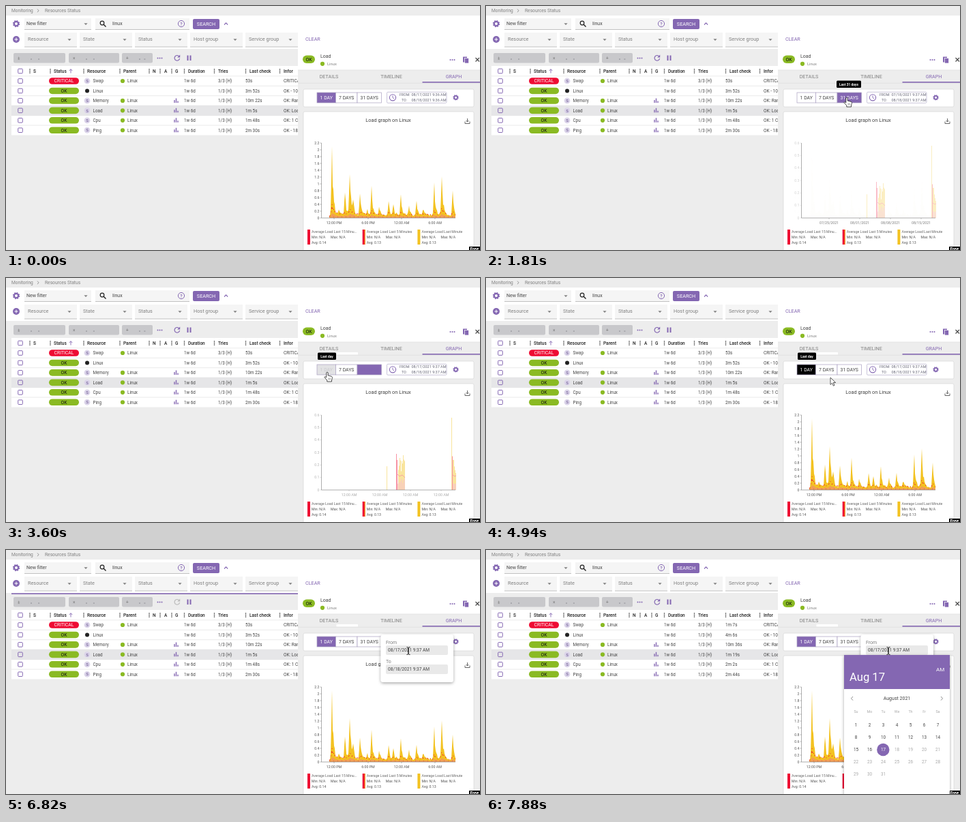
Write an HTML page that moves like this. It is 695 px wide and 358 px high and loops after 8000 ms.

```html
<!DOCTYPE html>
<html lang="en">
<head>
<meta charset="utf-8">
<title>Resources status</title>
<style>
html, body { margin: 0; width: 100%; height: 100%; overflow: hidden; background: #ededed; }
svg { display: block; width: 695px; height: 358px; font-family: Roboto, Arial, sans-serif; }
</style>
</head>
<body>
<svg id="stage" viewBox="0 0 695 358" xmlns="http://www.w3.org/2000/svg"></svg>
<script>
const LOOP = 8000;
const PURPLE = '#8467b2', GREEN = '#8aba23', RED = '#ee0b33', YELLOW = '#f3c220', INK = '#444', GREY = '#808080';

// Drawing helpers
const rect = (x, y, w, h, fill, more = '') => `<rect x="${x}" y="${y}" width="${w}" height="${h}" fill="${fill}" ${more}/>`;
const dot = (x, y, r, fill, more = '') => `<circle cx="${x}" cy="${y}" r="${r}" fill="${fill}" ${more}/>`;
const line = (d, color, w = 1, more = '') => `<path d="${d}" fill="none" stroke="${color}" stroke-width="${w}" ${more}/>`;
const fill = (d, color, more = '') => `<path d="${d}" fill="${color}" ${more}/>`;
const text = (x, y, s, size = 6.5, color = INK, anchor = 'start', more = '') =>
  `<text x="${x}" y="${y}" font-size="${size}" fill="${color}" text-anchor="${anchor}" ${more}>${s}</text>`;
const mid = (x, y, s, size, color, more) => text(x, y, s, size, color, 'middle', more);
const group = (id, body, more = '') => `<g id="${id}" ${more}>${body}</g>`;
const BOLD = 'font-weight="500"';

const gear = (x, y, r) =>
  dot(x, y, r * .62, 'none', `stroke="${PURPLE}" stroke-width="${r * .45}"`) +
  dot(x, y, r * .88, 'none', `stroke="${PURPLE}" stroke-width="${r * .3}" stroke-dasharray="${r * .38} ${r * .311}"`);
const caret = (x, y, c = GREY) => fill(`M${x - 2.6} ${y - 1.3}h5.2l-2.6 2.7z`, c);
const dots = (x, y, c = PURPLE) => [-3, 0, 3].map(d => dot(x + d, y, 1, c)).join('');
const kebab = (x, y) => [-2.5, 0, 2.5].map(d => dot(x, y + d, .8, '#222')).join('');
const box = (x, y) => rect(x - 3.3, y - 3.3, 6.6, 6.6, 'none', `rx="1" stroke="${PURPLE}" stroke-width="1"`);

function filters() {
  let s = rect(0, 0, 695, 14, '#ededed') + rect(0, 14, 695, 49, '#fff');
  s += text(8, 9, 'Monitoring', 6.6, GREY) + line('M46 4.5l2 2.3-2 2.3', GREY, .8) + text(57, 9, 'Resources Status', 6.7, GREY);
  s += gear(15, 26, 5) + rect(27, 18, 98, 16.5, '#f5f5f5') + rect(131, 18, 138, 16.5, '#f5f5f5');
  s += line('M27 34.5h98M131 34.5h138', '#aaa', .7);
  s += text(30, 28.3, 'New filter', 7) + caret(117, 26.5);
  s += dot(141, 25, 2.8, 'none', 'stroke="#222" stroke-width="1.2"') + line('M143 27l3.5 3.5', '#222', 1.4);
  s += text(156, 28.3, 'linux', 7);
  s += dot(257, 26, 4.6, 'none', `stroke="${PURPLE}" stroke-width="1"`) + mid(257, 28.7, '?', 7, PURPLE, BOLD);
  s += rect(274, 19, 39, 15, PURPLE, 'rx="2"') + mid(293.5, 28.7, 'SEARCH', 7.2, '#fff');
  s += line('M320 27.5l2.6-2.6 2.6 2.6', PURPLE, 1.1);
  s += dot(15, 49, 5, PURPLE) + line('M12.5 49h5M15 46.5v5', '#fff', 1);
  ['Resource', 'State', 'Status', 'Host group', 'Service group'].forEach((name, i) => {
    const x = 27 + 81 * i;
    s += rect(x, 39, 77, 21, '#f5f5f5') + line(`M${x} 60h77`, '#aaa', .7) + text(x + 5, 51.2, name, 7.3, GREY) + caret(x + 66, 49.5);
  });
  return s + text(439, 51.3, 'CLEAR', 7.2, PURPLE);
}

const ROWS = [
  ['Swap', 53, 'CRITICAL'], ['Linux', 232, 'OK - 10'], ['Memory', 622, 'OK: Ram'],
  ['Load', 65, 'OK: Load'], ['Cpu', 108, 'OK: 1 CPU'], ['Ping', 150, 'OK - 18']
];
const ago = n => (n >= 60 ? Math.floor(n / 60) + 'm ' : '') + n % 60 + 's';

function table() {
  let s = rect(0, 63, 428, 295, '#ededed');
  [[11, 76], [92, 74], [170, 45]].forEach(([x, w], i) => {
    s += rect(x, 69, w, 14.5, '#c8c8cb', 'rx="2"') + text(x + 6, 78.5, ['±', '×', '+'][i], 6.5, '#777');
    s += line(`M${x + 25} 78h2m${w * .12} 0h2`, '#8b8b92', 1);
  });
  s += dots(225.5, 76.5);
  s += group('refresh', line('M253.6 73.6a3.8 3.8 0 1 0 1 3.6', 'currentColor', 1.2) + fill('M255.2 71.6v4h-4z', 'currentColor'));
  s += rect(265.5, 72.5, 2, 7.5, PURPLE) + rect(269.5, 72.5, 2, 7.5, PURPLE);
  s += rect(8, 88, 420, 101.5, '#fff') + box(21, 95.5);
  [[35, 40, 'S'], [65, 70, 'Status'], [114, 119, 'Resource'], [167, 172, 'Parent'], [210, 215, 'N'], [226, 232, 'A'],
    [243, 248, 'G'], [261.5, 267, 'Duration'], [305.5, 311, 'Tries'], [351.5, 357, 'Last check'], [401.5, 407, 'Infor']
  ].forEach(([k, x, name]) => s += kebab(k, 95.5) + text(x, 97.6, name, 6.5, '#222', 'start', BOLD));
  s += line('M95 98.5v-5.8m-2.3 2.3l2.3-2.3 2.3 2.3', PURPLE, .9);
  ROWS.forEach(([name, , info], i) => {
    const y = 110 + 14.45 * i, b = y + 2.3, crit = !i, host = i === 1;
    if (name === 'Load') s += rect(8, y - 7.2, 420, 14.4, '#e6e6e8');
    s += line(`M8 ${y - 7.2}h420`, '#dcdcdc', .6) + box(21, y);
    s += rect(63, y - 4.8, 44, 9.6, crit ? RED : GREEN, 'rx="4.8"') + mid(85, b, crit ? 'CRITICAL' : 'OK', 6.8, crit ? '#fff' : '#111');
    s += host ? dot(119, y, 3, '#222') : dot(119, y, 4.4, '#dcd5ea') + mid(119, y + 2.2, 'S', 6, '#5f4a86');
    s += text(127.5, b, name, 6.3);
    if (!host) s += dot(171, y, 3.1, GREEN) + text(178, b, 'Linux', 6.3);
    if (i > 1) s += line(`M247 ${y + 3}v-4M249.5 ${y + 3}v-6.5M252 ${y + 3}v-2.5`, PURPLE, 1.4);
    s += text(261, b, '1w 6d', 6.3) + text(311, b, (crit ? 3 : 1) + '/3 (H)', 6.3);
    s += text(351, b, '', 6.3, INK, 'start', `id="ago${i}"`) + text(407, b, info, 6.5);
  });
  return s + rect(8, 63.3, 420, 1.6, PURPLE, 'id="bar"');
}

function panel() {
  let s = rect(428, 63, 267, 295, '#ededed') + rect(428, 63, 267, 31, '#fff');
  s += rect(435, 72.5, 18, 11.5, GREEN, 'rx="5.7"') + mid(444, 81, 'OK', 7, '#111');
  s += text(461, 75.8, 'Load', 7) + dot(464, 84.8, 3.1, GREEN) + text(471, 87, 'Linux', 5.8, GREY);
  s += dots(654.5, 79);
  s += rect(670, 74.5, 6, 8, PURPLE) + rect(672.5, 76.5, 6, 7.5, PURPLE, 'stroke="#fff" stroke-width=".7"');
  s += line('M688.5 76l5.5 5.5m0-5.5l-5.5 5.5', '#444', 1.1);
  s += line('M428 94h267M428 113.2h267', '#d8d8d8', .6);
  s += mid(473.5, 106, 'DETAILS', 7.2, GREY) + mid(565, 106, 'TIMELINE', 7.2, GREY) + mid(656.5, 106, 'GRAPH', 7.2, PURPLE);
  s += rect(610.5, 111, 84.5, 1.6, PURPLE) + rect(484.5, 109, 31.5, 3.4, '#fff', 'id="strip"');
  const edge = 'rx="2" stroke="#d2d2d2" stroke-width=".6"';
  s += rect(436, 122, 250, 26, '#fff', edge) + rect(436, 155, 250, 210, '#fff', edge);
  [['1 DAY', 456, 27.5], ['7 DAYS', 483.5, 31.5], ['31 DAYS', 515, 35.5]].forEach(([name, x, w], i) => {
    s += rect(x, 127, w, 15, '#fff', `id="btn${i}" stroke="#aaa0c0" stroke-width=".7"`) + mid(x + w / 2, 136.8, name, 6.9, INK, `id="lab${i}"`);
  });
  s += rect(558.5, 126.3, 87.5, 16, '#fff', 'rx="1.5" stroke="#b4aecb" stroke-width=".7"');
  s += dot(567, 134.3, 4.6, 'none', `stroke="${PURPLE}" stroke-width="1.1"`) + line('M567 131.5v3l2 1.4', PURPLE, .9);
  s += text(577, 132, 'FROM:', 5.2, '#667') + text(580, 139.9, 'TO:', 5.2, '#667');
  s += text(594.5, 132, '', 5.5, '#667', 'start', 'id="from"') + text(594.5, 139.9, '', 5.5, '#667', 'start', 'id="to"');
  s += gear(659.5, 134.3, 4);
  s += mid(560.5, 170.2, 'Load graph on Linux', 7.4) + line('M676.5 165v5m-2-2l2 2 2-2M673 169.5v3h7v-3', '#555', .9);
  [['15 Minu...', RED, '0.14'], ['5 Minutes', RED, '0.13'], ['Minute', YELLOW, '0.13']].forEach(([name, c, avg], i) => {
    const x = 442 + 80.7 * i, y = [333, 341, 349];
    s += rect(x, 328, 4, 22, c) + (i === 1 ? rect(x + 3, 328, 1, 22, YELLOW) : '');
    s += text(x + 6, y[0], 'Average Load Last ' + name, 5.2, '#666') + text(x + 6, y[1], 'Min: N/A', 5.2, '#555');
    s += text(x + 34, y[1], 'Max: N/A', 5.2, '#555') + text(x + 6, y[2], 'Avg: ' + avg, 5.2, '#555');
  });
  return s + rect(679, 353, 16, 5, '#000') + text(680.5, 359, 'Free', 6.5, '#fff', 'start', 'font-weight="700"');
}

// Charts
const noise = i => { const v = Math.sin(i * 91.7) * 4375.5; return v - Math.floor(v); };
const PEAKS = [[478, 2], [488, .18], [497, .65], [504, 1.2], [509, .38], [519, .66], [530, .15], [536, .82], [547, .22], [561, .38],
  [568, .3], [579, .62], [591, .3], [602, .42], [612, .18], [628, .95], [639, 1.1], [655, .7]];
function load(x, gain, decay, base) {
  return PEAKS.reduce((sum, [p, v]) => {
    const d = x - p;
    return sum + v * gain * (d < 0 ? Math.exp(-d * d / 1.5) : Math.exp(-d / decay) * (d ? .6 + .6 * noise(x) : 1));
  }, base * (.6 + noise(x + .3)));
}
function curve(gain, decay, base, area) {
  let d = '';
  for (let x = 474; x <= 659; x++) d += `${d ? 'L' : 'M'}${x} ${(311 - 50 * load(x, gain, decay, base)).toFixed(1)}`;
  return area ? d + 'V311H474z' : d;
}
const bars = (x0, n, f) => Array.from({ length: n }, (_, i) => `M${x0 + i} 311v${(-183 * f(i)).toFixed(1)}h1V311z`).join('');

function scale(top, step) {
  let s = '';
  const n = Math.round(top / step);
  for (let i = 0; i <= n; i++) {
    const y = 311 - 110 * i / n;
    s += text(459.5, y + 1.8, +(i * step).toFixed(1), 5.2, '#555', 'end') + line(`M460.5 ${y}h2`, '#777', .5);
  }
  return s;
}
const ticks = (xs, names) => xs.map((x, i) => mid(x, 319.5, names[i % names.length], 5.3, '#555') + line(`M${x} 311v2`, '#777', .5)).join('');
const DAY_X = [481, 531, 580, 629], MONTH_X = [503, 548, 593, 638];

function charts() {
  const day = fill(curve(1, 2, .08, true), YELLOW) + fill(curve(.07, 6, .03, true), '#f0857a', 'opacity=".6"') +
    line(curve(.16, 4.5, .07), RED, .9, 'stroke-dasharray="2 5 1 4"') + line('M474 309.5h185', '#b33', .5, 'stroke-dasharray="1 5"');
  const month = fill(bars(558, 1, () => .19) + bars(575, 10, i => .13 + .15 * noise(i + 3)) + bars(653, 1, () => .58) +
    bars(655, 5, i => .24 - .03 * i + .04 * noise(i)), YELLOW) +
    fill(bars(572, 2, i => .29 - .05 * i) + bars(654, 1, () => .27), RED) +
    fill(bars(574, 11, i => .05 + .05 * noise(i)) + bars(655, 5, () => .05), '#f0857a', 'opacity=".7"') +
    line('M574 288l3 3 4-2 4 4M655 289l3 2 2-1', RED, .8);
  return group('day', scale(2.2, .2) + day) + group('month', scale(.6, .1) + month) +
    group('dayTicks', ticks(DAY_X, ['12:00 PM', '6:00 PM', '12:00 AM', '6:00 AM'])) +
    group('monthTicks', ticks(MONTH_X, ['07/25/2021', '08/01/2021', '08/08/2021', '08/15/2021'])) +
    group('hourTicks', ticks(MONTH_X, ['12:00 AM'])) +
    line('M462.5 201v110H659', '#777', .6);
}

function popover() {
  const field = (name, y, value) => text(557, y, name, 7, GREY) + rect(557, y + 2.5, 91, 14, '#e9e9e9', 'rx="2"') + text(560, y + 11.6, value, 6.6);
  return rect(549.5, 124, 106.5, 70, '#fff', 'rx="4" filter="url(#shade)"') + field('From', 137.5, '08/17/2021 9:37 AM') + field('To', 165.5, '08/18/2021 9:37 AM');
}

function calendar() {
  let s = rect(525, 154, 155, 210, '#fff', 'filter="url(#shade)"') + rect(525, 154, 155, 50, PURPLE);
  s += text(533, 191.5, 'Aug 17', 16.6, '#fff') + text(660, 178, 'AM', 8, '#fff');
  s += line('M538 215l-2.5 2.8 2.5 2.8M667 215l2.5 2.8-2.5 2.8', GREY, .9) + mid(602.5, 220, 'August 2021', 7);
  ['Su', 'Mo', 'Tu', 'We', 'Th', 'Fr', 'Sa'].forEach((d, i) => s += mid(542.5 + 20 * i, 239.3, d, 5.4, '#aaa'));
  s += dot(582.3, 293, 9.2, PURPLE);
  for (let d = 1; d <= 31; d++) {
    const i = d - 1;
    s += mid(542.5 + 20 * (i % 7), 258.6 + 18.1 * Math.floor(i / 7), d, 6.3, d === 17 ? '#fff' : d > 17 ? '#aaa' : INK);
  }
  return s;
}

const tip = (id, x, w, s, bg, fg) =>
  group(id, rect(x - w / 2, 109.5, w, 10.5, bg, 'rx="1.5"') + mid(x, 116.5, s, 4.9, fg, 'font-weight="700"'));

const cursors =
  group('arrow', fill('M0 0v10.5l2.5-2.3 1.8 4 1.7-.8-1.8-3.9h3.4z', '#fff', 'stroke="#333" stroke-width=".8"')) +
  group('hand', fill('M-1.2.8Q0-.8 1.2.8V5l5.2 1.4q1.2.5 1 2L6.5 12v2h-6.7v-2l-4-4.5q.8-1.8 3 .4z', '#fff', 'stroke="#222" stroke-width=".8"') +
    line('M2.2 8.5v3M4.2 8.5v3', '#222', .5)) +
  group('beam', line('M-2.5-5.5q2.5 0 2.5 1.2v8.6q0 1.2-2.5 1.2M2.5-5.5Q0-5.5 0-4.3v8.6q0 1.2 2.5 1.2', '#222', 1));

document.getElementById('stage').innerHTML =
  `<defs><filter id="shade" x="-20%" y="-20%" width="140%" height="140%"><feDropShadow dx="0" dy="1.5" stdDeviation="2.2" flood-opacity=".35"/></filter></defs>` +
  filters() + table() + panel() + charts() +
  tip('tip31', 532, 36, 'Last 31 days', '#000', '#fff') + tip('tip7', 499.7, 32, 'Last 7 days', PURPLE, '#111') + tip('tip1', 470.5, 27, 'Last day', '#000', '#fff') +
  group('popover', popover()) + group('calendar', calendar()) +
  group('cursor', dot(0, 5, 9, '#f6ef6a', 'id="glow" style="mix-blend-mode:multiply"') + cursors);

// Animation
const el = {};
document.querySelectorAll('[id]').forEach(n => el[n.id] = n);
const set = (id, name, v) => el[id].setAttribute(name, v);
const fade = (id, v) => set(id, 'opacity', v);
const ramp = (t, a, b) => Math.min(1, Math.max(0, (t - a) / (b - a)));
const ease = u => u * u * (3 - 2 * u);
const pulse = (t, a, b, c, d) => ramp(t, a, b) * (1 - ramp(t, c, d));

// time, x, y of the pointer
const PATH = [[190, 662, 215], [930, 529, 134], [2210, 529, 134], [2630, 479, 138], [2920, 471, 138], [4900, 471, 138],
  [4940, 505, 146], [5710, 600, 136], [6050, 600, 136], [6600, 590, 148], [LOOP, 590, 148]];
function pointer(t) {
  const i = Math.max(1, PATH.findIndex(p => p[0] >= t));
  const [t0, x0, y0] = PATH[i - 1], [t1, x1, y1] = PATH[i], u = ease(ramp(t, t0, t1));
  return [x0 + (x1 - x0) * u, y0 + (y1 - y0) * u];
}

function button(i, bg, fg) {
  set('btn' + i, 'fill', bg);
  set('lab' + i, 'fill', fg);
}

function draw(t) {
  const toMonth = ramp(t, 1330, 2010), toDay = ramp(t, 3320, 4020);
  const out = u => Math.max(0, 1 - 1.4 * u), into = u => ramp(u, .6, 1);
  fade('day', toDay > 0 ? into(toDay) : out(toMonth));
  fade('month', toDay > 0 ? out(toDay) : into(toMonth));
  const k = toDay > 0 ? toDay : toMonth;
  const dim = 1 - .5 * pulse(k, 0, .2, .5, .9);
  const axis = toMonth < .2 || toDay >= .6 ? 'dayTicks' : toDay >= .1 ? 'hourTicks' : 'monthTicks';
  ['dayTicks', 'hourTicks', 'monthTicks'].forEach(id => fade(id, id === axis ? dim : 0));

  const monthDates = t >= 1400 && t < 3400, clock = t < 1400 ? ' 9:36 AM' : ' 9:37 AM';
  el.from.textContent = (monthDates ? '07/18/2021' : '08/17/2021') + clock;
  el.to.textContent = '08/18/2021' + clock;

  if (t < 1400) button(0, PURPLE, '#fff');
  else if (t < 3320) button(0, '#fff', INK);
  else if (t < 3700) button(0, '#e2e2e4', '#cacace');
  else if (t >= 3900 && t < 5000) button(0, '#000', '#fff');
  else button(0, PURPLE, '#fff');
  if (t >= 1400 && t < 3700) button(2, PURPLE, t < 3320 ? '#fff' : PURPLE);
  else button(2, '#fff', INK);

  fade('tip31', pulse(t, 1000, 1130, 2210, 2400));
  fade('tip7', pulse(t, 2450, 2560, 2660, 2800));
  fade('tip1', pulse(t, 2780, 2920, 4990, 5200));
  fade('strip', t >= 2860 ? 1 : 0);

  const busy = t >= 6750 && t < 7150;
  fade('bar', busy ? 1 : 0);
  set('refresh', 'color', busy ? '#bbb' : PURPLE);
  ROWS.forEach((r, i) => el['ago' + i].textContent = ago(r[1] + (t >= 7080 ? 14 : 0)));

  fade('popover', ramp(t, 5740, 5850));
  const open = ease(ramp(t, 7420, 7800)), z = .85 + .15 * open;
  fade('calendar', open);
  set('calendar', 'transform', `translate(602.5 256) scale(${z}) translate(-602.5 -256)`);

  const [x, y] = pointer(t);
  set('cursor', 'transform', `translate(${x.toFixed(2)} ${y.toFixed(2)})`);
  fade('cursor', t >= 200 ? 1 : 0);
  const beam = t >= 6300;
  const hand = !beam && ((t >= 900 && t < 4930) || t >= 5500);
  fade('beam', beam ? 1 : 0);
  fade('hand', hand ? 1 : 0);
  fade('arrow', beam || hand ? 0 : 1);
  fade('glow', pulse(t, 1200, 1320, 1450, 1700));
}

const start = performance.now();
function tick() {
  draw((performance.now() - start) % LOOP);
  requestAnimationFrame(tick);
}
draw(0);
requestAnimationFrame(tick);
</script>
</body>
</html>
```
